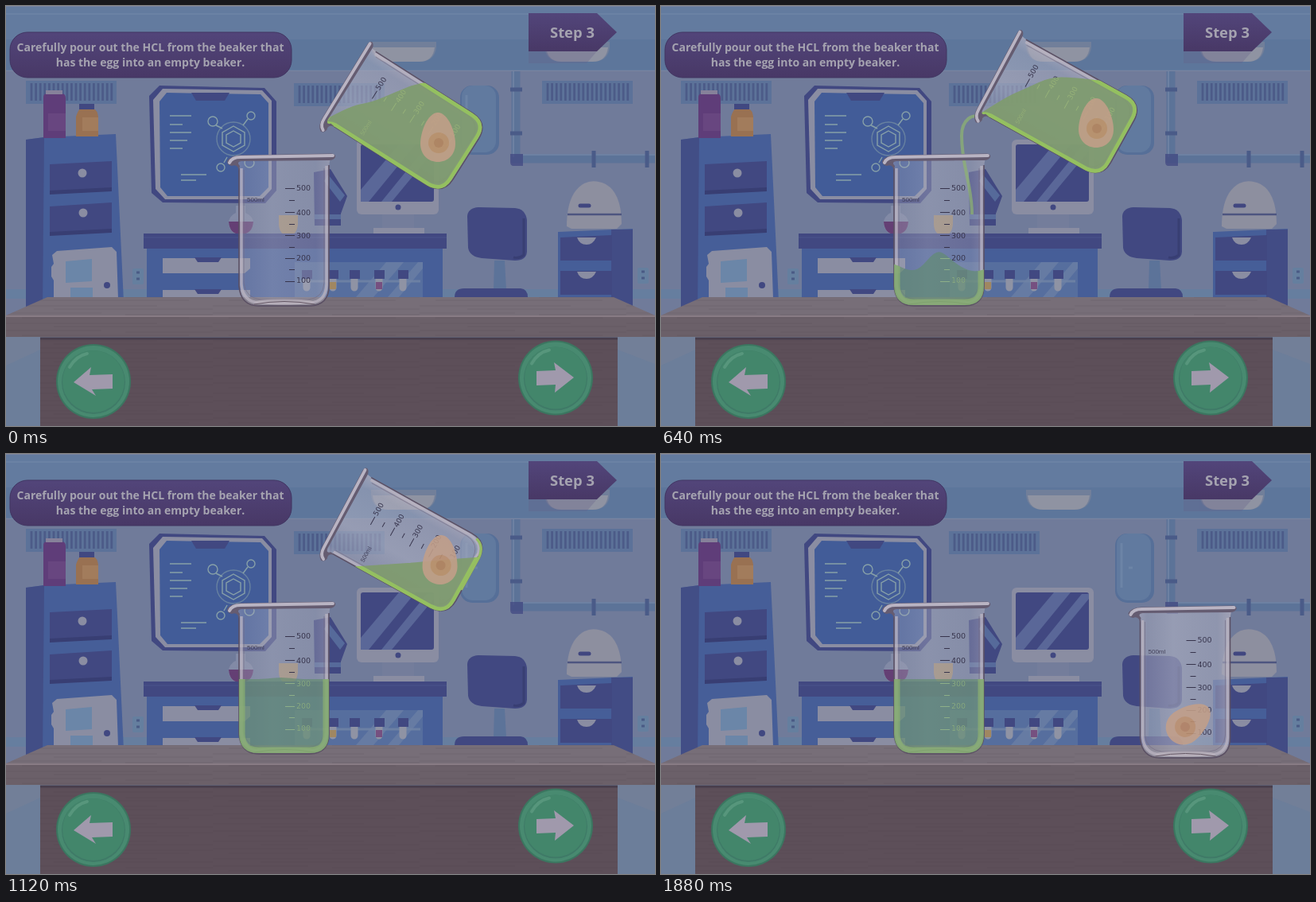
Write an HTML page that moves like this. It is 816 px wide and 528 px high and loops after 2 s.

```html
<!DOCTYPE html>
<html lang="en">
<head>
<meta charset="utf-8">
<title>Pouring between beakers</title>
<style>
  html, body { margin: 0; width: 100%; height: 100%; overflow: hidden; background: #707b9a; }
  svg { display: block; width: 100%; height: 100%; }
  .title { font: bold 14px "Open Sans", sans-serif; fill: #a5a3b0; text-anchor: middle; }
  .step { font: bold 18.4px "Open Sans", sans-serif; fill: #a5a3b0; }
  .scale { font: 9.5px "DejaVu Sans", sans-serif; }
  .volume { font: 8px "Liberation Sans", sans-serif; }
  .blue { fill: #465e98; }
  .navy { fill: #414881; }
  .pale { fill: #8a8da2; }
  .line { fill: none; stroke: #87a0a8; stroke-width: 1.4; }
</style>
</head>
<body>
<svg viewBox="0 0 816 528" preserveAspectRatio="none">
  <defs>
    <pattern id="slats" width="5.6" height="40" patternUnits="userSpaceOnUse">
      <rect width="2.8" height="40" fill="#4c5b88"/>
    </pattern>
    <pattern id="grain" width="260" height="22" patternUnits="userSpaceOnUse">
      <path d="M0 3H190M60 7H260M0 12H120M150 14H260M20 18H230" stroke="#392d3a" stroke-opacity=".13"/>
    </pattern>
    <linearGradient id="plum" x2="0" y2="1">
      <stop stop-color="#52457a"/><stop offset="1" stop-color="#483866"/>
    </linearGradient>
    <linearGradient id="sheen">
      <stop stop-color="#b4afc0" stop-opacity=".7"/><stop offset=".13" stop-color="#a4a6ba" stop-opacity=".5"/>
      <stop offset=".4" stop-color="#b2b4c6" stop-opacity=".58"/><stop offset=".85" stop-color="#abadc0" stop-opacity=".52"/>
      <stop offset="1" stop-color="#b8b3c2" stop-opacity=".7"/>
    </linearGradient>
    <path id="bowl" d="M290 191H408Q406 198 406 208V352Q406 376 382 376H317Q294 376 293 352V208Q292 198 286 196Z"/>
    <clipPath id="inside"><use href="#bowl"/></clipPath>
    <clipPath id="filledLeft"><path id="leftSurface"/></clipPath>
    <clipPath id="filledRight"><path id="rightSurface"/></clipPath>
    <g id="walls" fill="none">
      <path d="M296 204V350Q298 372 318 373H382Q402 372 403 350V201" stroke="#bbb5c2" stroke-opacity=".75" stroke-width="3.500"/>
      <path d="M293 204V352Q295 377 318 377H382Q406 376 406 352V200" stroke="#5b5064" stroke-width="1.600"/>
      <path d="M299 206V348Q301 367 320 369H380Q399 367 400 348V204" stroke="#736a80" stroke-opacity=".6"/>
      <ellipse cx="350" cy="372" rx="38" ry="3.500" fill="#bbb2bd" fill-opacity=".7"/>
      <path d="M312 375Q350 368 388 375" stroke="#645764"/>
    </g>
    <g id="rim">
      <path d="M293 207Q291 198 284 201Q278 200 278 195Q282 188 294 187.500L409 185.500Q415 186 414 190Q412 194 406 194L296 195Q289 196 294 201Z" fill="#655c71"/>
      <path d="M281 197Q284 190 295 190L411 188" fill="none" stroke="#b9b4c3" stroke-width="4" stroke-linecap="round"/>
    </g>
    <g id="marks">
      <path fill="none" stroke="currentColor" d="M351 229.500h12M351 259.500h12M351 288.500h12M351 317.500h12M351 346.500h12M356 244.500h7M356 274.500h7M356 303.500h7M356 331.500h7"/>
      <g class="scale" fill="currentColor">
        <text x="365" y="232">500</text><text x="365" y="263">400</text><text x="365" y="291.500">300</text>
        <text x="365" y="319.500">200</text><text x="365" y="348">100</text>
      </g>
      <text class="volume" x="303" y="246" fill="currentColor" fill-opacity=".85">500ml</text>
    </g>
    <g id="vent"><rect width="114" height="29" fill="#5c7299"/><rect x="3" y="3" width="108" height="22" fill="url(#slats)"/></g>
    <g id="outlet"><rect width="14" height="20" rx="2" fill="#657f9f"/><path d="M5 5h4M5 13h4" stroke="#4a5b85" stroke-width="3"/></g>
    <g id="lamp"><path d="M0 0H82V7Q80 25 60 25H22Q2 25 0 7Z" fill="#717f9a"/><path d="M2 7H80Q78 25 60 25H22Q4 25 2 7Z" fill="#8f93a2"/></g>
    <g id="button">
      <circle r="47" fill="#3b7660"/><circle r="45" fill="#488a70"/><circle cy="1" r="40" fill="#3f7a67"/>
      <circle r="39" fill="#43866b"/>
      <path d="M-30-18Q-22-32-8-35" fill="none" stroke="#6ba58d" stroke-opacity=".5" stroke-width="4" stroke-linecap="round"/>
    </g>
  </defs>

  <!-- room -->
  <rect width="816" height="528" fill="#707b9a"/>
  <rect width="816" height="81" fill="#637b9f"/>
  <path d="M0 42H816V80H0Z" fill="#5d769b"/>
  <path d="M0 .5H816M0 81.500H816" stroke="#7984a0"/>
  <path d="M0 10H816" stroke="#6b82a4" stroke-width="2"/>
  <rect y="356" width="816" height="12" fill="#667e9f"/>
  <use href="#lamp" x="459" y="45"/><use href="#lamp" x="677" y="45"/>
  <use href="#vent" x="25" y="94"/><use href="#vent" x="362" y="97"/><use href="#vent" x="674" y="94"/>
  <use href="#outlet" x="159" y="330"/><use href="#outlet" x="794" y="329"/>

  <!-- tank and pipes -->
  <path d="M641 82V192H816" fill="none" stroke="#5c7398" stroke-width="11"/>
  <path d="M638 82V190M650 187H816" stroke="#6d81a2" stroke-width="2"/>
  <path d="M634 105H649M634 160H649M739 182V203M806 182V203" stroke="#4a5b88" stroke-width="5"/>
  <path class="navy" d="M634 186h16v15h-12q-4 0-4-5z" opacity=".75"/>
  <rect x="571" y="100" width="49" height="87" rx="15" fill="#566f98"/>
  <rect x="573" y="100" width="43" height="84" rx="14" fill="#617a9f"/>
  <path d="M579 112V168M588 143h5" stroke="#6c84a6" stroke-width="3"/>

  <!-- tall cabinet -->
  <path class="blue" d="M48 165L138 161 148 372 25 378V168Z"/>
  <path class="navy" d="M25 168L48 165 46 378H25Z" opacity=".75"/>
  <path class="navy" d="M55 199L133 195V232L55 235ZM55 252L133 247V284L55 288Z"/>
  <path d="M55 232L133 228V233L55 237ZM55 284L133 280V285L55 289Z" fill="#383e73"/>
  <circle class="pale" cx="96" cy="210" r="5.500"/><circle class="pale" cx="97" cy="260" r="5.500"/>
  <path class="pale" d="M58 313L64 308 133 303 139 309 141 368H60V345L57 340V328L60 324Z"/>
  <path d="M75 321L108 318V346L75 348Z" fill="#6b86a8"/><path d="M81 354H109V367H81Z" fill="#6b86a8"/>
  <circle class="navy" cx="127" cy="351" r="4"/>
  <path d="M47 115Q47 110 52 110H70Q75 110 75 116V166H47Z" fill="#5f3d79"/>
  <path d="M50 106H71V111H50Z" fill="#86819a"/><path d="M53 135H75V157H53Z" fill="#684680"/>
  <path d="M88 139Q91 130 94 129H110Q115 131 116 139V164H88Z" fill="#997152"/>
  <path class="navy" d="M92 123H111V130H92Z"/><path d="M96 140H116V157H96Z" fill="#a27c5c"/>

  <!-- wall board -->
  <path class="navy" d="M180 113L193 100 325 103 340 120V232L326 248 197 247 183 235Z"/>
  <path class="pale" d="M185 118L197 104 322 106 334 119V230L322 243 200 243 188 230Z"/>
  <path d="M193 120L202 109 320 111 330 122V228L319 239 203 239 194 228Z" fill="#425c98"/>
  <path class="navy" d="M233 109H281L275 119H239Z"/>
  <path class="line" d="M206 138h27M206 149h16M206 159h27M206 169h22M206 179h16M220 212h32M220 219h19M264 150L272 154M304 142L298 150M300 188L304 193M274 197L278 190M286 151L300 159V175L286 183 272 175V159ZM286 157L295 162V172L286 177 277 172V162Z"/>
  <g class="line">
    <circle cx="286" cy="167" r="21" stroke-opacity=".55"/><circle cx="260" cy="145" r="6"/><circle cx="308" cy="138" r="5"/>
    <circle cx="306" cy="197" r="6"/><circle cx="270" cy="203" r="5"/>
  </g>

  <!-- work desk -->
  <path class="navy" d="M387 209L408 205 429 239 421 261V276H388Z"/>
  <path d="M388 262H421V268H388ZM405 212L426 238 420 246 400 220Z" fill="#566a9a"/>
  <rect class="pale" x="441" y="168" width="103" height="94" rx="6"/>
  <rect class="navy" x="446" y="174" width="92" height="72" rx="3"/>
  <path d="M446 231L494 174H515L456 246H446ZM472 246L529 176H538V182L485 246Z" fill="#5a6798"/>
  <circle class="navy" cx="493" cy="253" r="3.500"/>
  <path d="M473 262H513V286H473Z" fill="#747d9b"/><path class="pale" d="M462 279H526V287H462Z"/>
  <path d="M289 251H301V260Q311 264 311 273Q309 287 295 287Q281 287 280 273Q280 264 289 260Z" fill="#828aa6"/>
  <path d="M280 271H311Q310 287 295 287Q281 287 280 271Z" fill="#643f74"/>
  <path d="M343 263H367V274Q366 288 355 289Q344 288 343 275Z" fill="#a28c70"/>
  <path class="blue" d="M177 303H549V372H177Z"/>
  <path class="navy" d="M173 286H554V305H173Z"/><path d="M173 291H554" stroke="#4a558c"/>
  <path class="pale" d="M197 317H307V330L300 336H197ZM197 357H307V367H197Z"/>
  <path class="navy" d="M237 316H271L267 322H241ZM237 356H271L267 362H241Z"/>
  <path d="M363 322H524V367H363Z" fill="#566e9e"/><path d="M366 346H521" stroke="#6c80a4" stroke-width="3"/>
  <path d="M440 366L478 322H500L462 366ZM480 366L518 322H524V330L494 366Z" fill="#6f83a6" opacity=".65"/>
  <path d="M378 340V354M411 340V354M438 340V354M469 340V354M499 340V354" stroke="#8f93a4" stroke-width="9" stroke-linecap="round"/>
  <path class="navy" d="M372 332h13v11h-13zM405 332h13v11h-13zM432 332h13v11h-13zM463 332h13v11h-13zM493 332h13v11h-13z"/>
  <path d="M411 347V356" stroke="#a08761" stroke-width="8"/><path d="M469 347V356" stroke="#765080" stroke-width="8"/>

  <!-- chair, helmet and low cabinet -->
  <path class="navy" d="M580 264Q581 254 594 253L640 254Q653 255 655 269V309Q654 320 640 320L598 317Q583 315 581 304Z"/>
  <path d="M651 267V313Q645 318 638 316" fill="none" stroke="#383e73" stroke-width="3"/>
  <path d="M614 320H627L629 357H613Z" fill="#5c7399"/>
  <path class="navy" d="M564 366Q564 355 576 355H647Q656 356 656 366Z"/>
  <path d="M705 277Q705 235 727 223Q739 217 754 224Q774 235 774 274L768 280H711Z" fill="#8d8f9f"/>
  <path d="M706 262H774" stroke="#4d5580" stroke-width="2.500"/><path d="M722 251H733" stroke="#414780" stroke-width="5" stroke-linecap="round"/>
  <path class="blue" d="M694 284L788 280V378H694Z"/><path class="navy" d="M761 281H788V378H761Z" opacity=".8"/>
  <path class="navy" d="M697 291L762 288V320H697ZM697 333H762V363H697Z"/>
  <path class="pale" d="M718 291H742Q738 300 730 300Q721 300 718 291ZM718 334H742Q738 343 730 343Q721 343 718 334Z"/>

  <!-- table -->
  <path d="M0 416H816V528H0Z" fill="#727f98"/>
  <path d="M0 452L43 432V528H0ZM769 432L816 450V528H769Z" fill="#6c7e9a"/>
  <path d="M52 366H764L816 389H0Z" fill="#776e78"/>
  <path d="M0 389H816V416H0Z" fill="#6b6069"/><path d="M0 390H816" stroke="#887b84" stroke-width="2"/>
  <path d="M43 417H769V528H43Z" fill="#5d4f59"/><path d="M43 418H769" stroke="#483e4c" stroke-width="3"/>
  <path d="M52 366H764L816 389V416H769V528H43V416H0V389Z" fill="url(#grain)"/>
  <use href="#button" x="110" y="472"/><use href="#button" x="691" y="467.500"/>
  <g fill="#a099ac">
    <path d="M85 473L107 454 105 464 134 463V481L108 482 113 490Z"/>
    <path d="M714 467L689 448 691 458 667 459V477L691 476 690 486Z"/>
  </g>

  <!-- captions -->
  <rect x="5" y="33" width="354" height="57" rx="22" fill="url(#plum)" stroke="#403461"/>
  <text class="title" x="181.500" y="57">Carefully pour out the HCL from the beaker that</text>
  <text class="title" x="181.500" y="76">has the egg into an empty beaker.</text>
  <path d="M657 57H743L730 72H657Z" fill="#655c88" opacity=".3"/>
  <path d="M657 9H743L768 33 743 57H657Z" fill="url(#plum)"/>
  <text class="step" x="684" y="40">Step 3</text>

  <!-- receiving beaker -->
  <use href="#bowl" fill="url(#sheen)" opacity=".7"/><use href="#walls"/><use href="#marks" color="#37344c"/>
  <path id="stream" pathLength="1" d="M404 142C392 132 378 144 378 163C378 202 391 224 391 262" fill="none" stroke="#8fb570" stroke-opacity=".7" stroke-width="4"/>
  <g clip-path="url(#filledLeft)">
    <use href="#bowl" fill="#628c70" fill-opacity=".66"/>
    <use href="#bowl" clip-path="url(#inside)" fill="none" stroke="#90b570" stroke-opacity=".65" stroke-width="15"/>
    <use href="#marks" color="#8daf88"/>
  </g>
  <use href="#rim"/>

  <!-- pouring beaker -->
  <g class="tilt"><use href="#bowl" fill="url(#sheen)"/><use href="#walls"/><use href="#marks" color="#37344c"/></g>
  <g clip-path="url(#filledRight)">
    <g class="tilt">
      <use href="#bowl" fill="#7f9c6e" fill-opacity=".92"/>
      <use href="#bowl" clip-path="url(#inside)" fill="none" stroke="#94c060" stroke-width="10"/>
      <use href="#marks" color="#98b47b"/>
    </g>
  </g>
  <g id="egg" opacity=".88">
    <path d="M0-31C13-31 22-6 22 8C22 22 12 31 0 31C-12 31-22 22-22 8C-22-6-13-31 0-31Z" fill="#c39f89"/>
    <circle cx="1" cy="7" r="13" fill="#bf916f"/><circle cx="1" cy="7" r="6" fill="#b58363"/>
  </g>
  <g class="tilt">
    <path id="residue" d="M334 376H382Q399 375 403 361" fill="none" stroke="#96bd62" stroke-width="3.500"/>
    <use href="#rim"/>
  </g>
</svg>
<script>
  const LOOP = 2000, STEP = 40, LIFT_END = 1120, SET_DOWN = 1520, SETTLE = 1880;
  const byId = id => document.getElementById(id);
  const tilted = document.querySelectorAll('.tilt');
  const clamp = v => Math.min(1, Math.max(0, v));

  // Each key is [time, ...values]; values run linearly between keys.
  function sample(keys, t) {
    const next = keys.findIndex(k => k[0] > t);
    if (next < 0) return keys[keys.length - 1].slice(1);
    if (next === 0) return keys[0].slice(1);
    const a = keys[next - 1], b = keys[next], u = (t - a[0]) / (b[0] - a[0]);
    return a.slice(1).map((v, i) => v + (b[i + 1] - v) * u);
  }

  const poseKeys = [ // x, y, tilt, scale
    [0, 502, 144, 57.6, .95], [280, 501, 136, 61, .95], [LIFT_END, 501.5, 114, 61, .95]
  ];
  const eggKeys = [ // x, y, turn
    [0, 543, 165, 0], [280, 544, 155, -3], [640, 547, 147, 0], [960, 547, 138, 2],
    [LIFT_END, 546, 133, 3], [1280, 607, 226, 45], [SET_DOWN, 664, 336, 52]
  ];
  const sloshX = [385, 430, 460, 490, 520, 560, 620];
  const sloshKeys = [
    [0, 152, 126, 121, 108, 96, 95, 95], [280, 152, 134, 121, 100, 97, 95, 95],
    [640, 146, 116, 103, 89, 90, 95, 95], [960, 138, 109, 108, 109, 104, 104, 105],
    [LIFT_END, 150, 142, 140, 138, 136, 132, 128], [1200, 240, 240, 240, 240, 240, 240, 240]
  ];
  const levelKeys = [ // height, swell
    [400, 376, 0], [640, 328, 16], [900, 283, 3], [960, 283, 0], [1280, 283, 4], [SET_DOWN, 283, 0]
  ];

  function pose(t) {
    if (t <= LIFT_END) return sample(poseKeys, t);
    const u = clamp((t - LIFT_END) / (SET_DOWN - LIFT_END)), left = 1 - u;
    return [659.5 - 158 * left ** 1.72, 114 + 171 * u, 61 * left ** 3.6, 1 - .05 * left ** .45];
  }

  // Smooth line through the midpoints, closed far below the stage.
  function below(points) {
    let d = `M${points[0]}`;
    for (let i = 1; i < points.length - 1; i++) {
      const [x, y] = points[i], [nx, ny] = points[i + 1];
      d += `Q${x} ${y} ${(x + nx) / 2} ${(y + ny) / 2}`;
    }
    const end = points[points.length - 1];
    return `${d}L${end}V600H${points[0][0]}Z`;
  }

  function draw(t) {
    const settle = t >= SETTLE ? 2 : 0;
    const [x, y, angle, scale] = pose(t);
    for (const part of tilted) {
      part.setAttribute('transform',
        `translate(${x} ${y + settle}) rotate(${-angle}) scale(${scale}) translate(-350 -282)`);
    }
    const [eggX, eggY, turn] = sample(eggKeys, t);
    byId('egg').setAttribute('transform', `translate(${eggX} ${eggY + settle}) rotate(${turn})`);

    const slosh = sample(sloshKeys, t);
    byId('rightSurface').setAttribute('d', t < 1200 ? below(sloshX.map((px, i) => [px, slosh[i]])) : '');
    byId('residue').setAttribute('opacity', t < LIFT_END ? 0 : clamp((1480 - t) / 200));

    const [level, swell] = sample(levelKeys, t);
    const points = Array.from({ length: 17 }, (_, i) => {
      const px = 286 + i * 8, r = (px - 346) / 17;
      return [px, level - swell * Math.exp(-r * r) + swell * .35 * Math.cos((px - 320) / 12) * (swell > 5)];
    });
    byId('leftSurface').setAttribute('d', t >= 400 ? below(points) : '');

    const head = clamp((t - 200) / 360), tail = clamp((t - 680) / 160);
    const stream = byId('stream');
    stream.setAttribute('visibility', head > tail ? 'visible' : 'hidden');
    stream.setAttribute('stroke-dasharray', `0 ${tail} ${head - tail} 2`);
  }

  const start = performance.now();
  function tick(now) {
    const t = Math.max(0, now - start) % LOOP;
    draw(Math.floor(t / STEP) * STEP);
    requestAnimationFrame(tick);
  }
  draw(0);
  requestAnimationFrame(tick);
</script>
</body>
</html>
```
